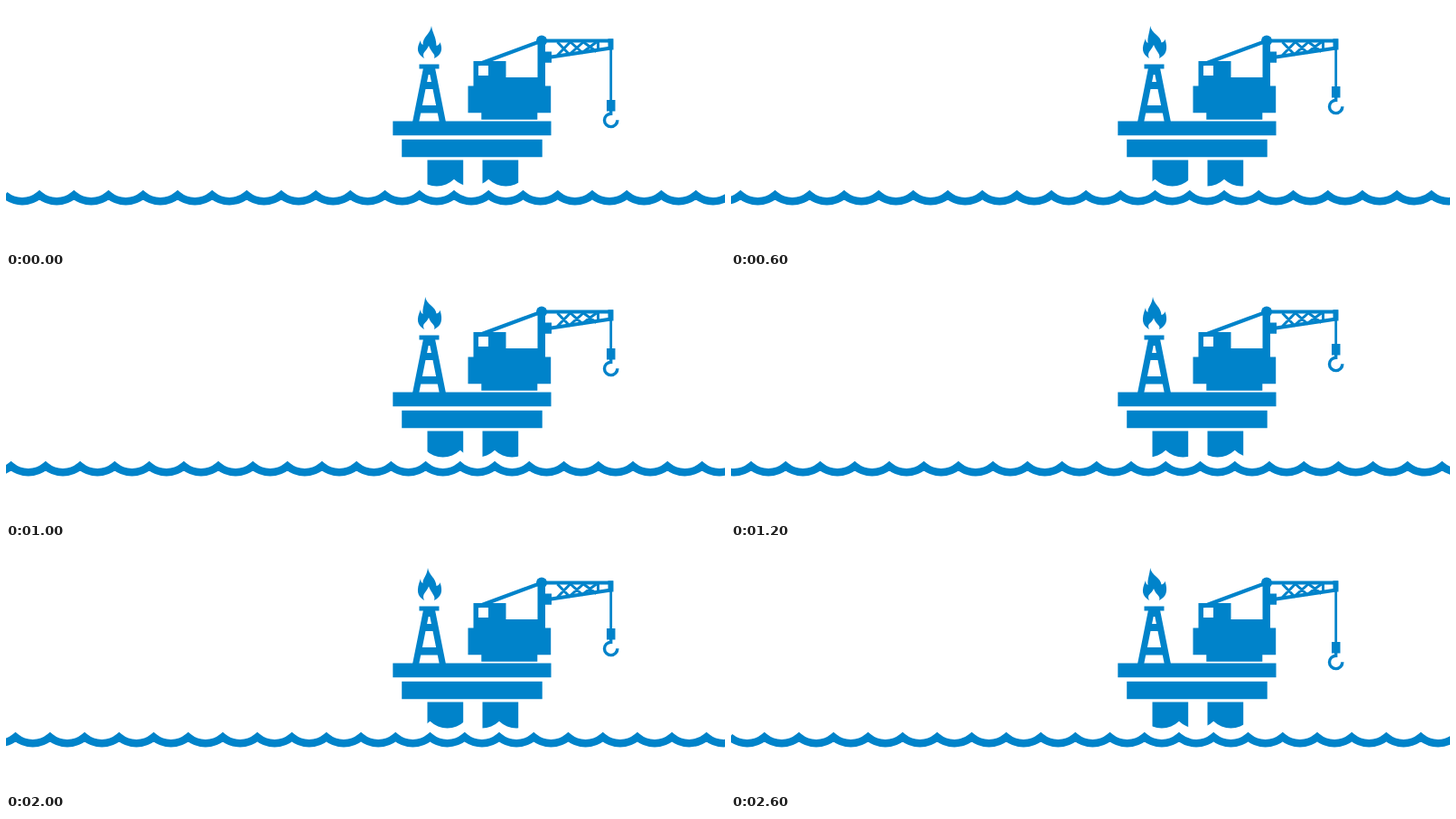
Write an HTML page that moves like this. It is 796 px wide and 269 px high and loops after 2800 ms.

```html
<!DOCTYPE html>
<html lang="en">
<head>
<meta charset="utf-8">
<title>Offshore platform</title>
<style>
  html, body { margin: 0; width: 100%; height: 100%; overflow: hidden; background: #fff; }
  svg { display: block; fill: #0083ca; }
  .line { fill: none; stroke: #0083ca; }
  .white { fill: #fff; }
</style>
</head>
<body>
<svg width="796" height="269" viewBox="0 0 796 269">
  <!-- deck and legs -->
  <path d="M428.300 127.500h175.200v15.700h-175.200zM438.200 147.800h155.500v19.500h-155.500z"/>
  <path d="M466.500 170.600h39.700v30h-39.700zM527.500 170.600h39.700v30h-39.700z"/>

  <!-- flare tower -->
  <path class="line" stroke-width="7" d="M465.900 67L453.500 129M471.100 67L483.500 129"/>
  <path d="M457.500 64.500h22v5h-22zM463 69h11v7h-11zM463 84h11v8h-11zM458 110h21v8.500h-21z"/>
  <path id="flame"/>

  <!-- crane -->
  <path d="M517.500 61h36v18h35v-41h8.500v50.500h6.200v29.800h-14.900v7.500h-62v-7.500h-14.800v-29.800h6z"/>
  <path class="white" d="M523 66h11v11h-11z"/>
  <circle cx="593" cy="38.500" r="6"/>
  <path d="M597 50.500h7v12.300h-7zM666.500 36.200h6v12.300h-6z"/>
  <path class="line" stroke-width="4.200" d="M523 64.500L593 38.500H672M600 57L670 46.500"/>
  <path class="line" stroke-width="3" id="lattice"/>
  <path class="line" stroke-width="2.800" id="cable"/>
  <g id="hook">
    <path d="M665 0h9.500v12.500h-9.500z"/>
    <path class="line" stroke-width="3.400" d="M669.700 12V15.200A7.200 7.200 0 1 0 676.900 22.200"/>
  </g>

  <!-- sea -->
  <g id="sea">
    <path class="white" id="gap"/>
    <path class="line" stroke-width="8.500" id="wave"/>
  </g>
</svg>
<script>
const STEP = 200, STEPS = 14, FLAME_STEPS = 8, WAVE = 38.25;
const el = id => document.getElementById(id);
const setPath = (id, d) => el(id).setAttribute('d', d);

const arcs = r => `a${r} ${r} 0 0 0 ${WAVE} 0`.repeat(24);
setPath('wave', 'M0 209.200' + arcs(29.8));
setPath('gap', `M0 191.800${arcs(27.6)}v14H0z`);

let lattice = 'M655.500 39V49';
for (let i = 0; i < 3; i++) {
  const x = 610.5 + 14.5 * i, h = 14.5 - 2 * i;
  lattice += `M${x} 40l14 ${h}m0 ${-h}l-14 ${h}`;
}
setPath('lattice', lattice);

// the tip sways while the side tongues and the hollow rise and fall
function flamePath(step) {
  const a = step / FLAME_STEPS * 2 * Math.PI;
  const tip = 467 + 4 * Math.cos(a);
  const left = 36 + 2 * Math.cos(2 * a);
  const right = 38 + 2 * Math.cos(a);
  const hollow = 44 - 1.5 * Math.sin(a);
  return `M${tip} 22C${tip + 1} 30 476 33 476.500 ${right + 4}` +
    `Q480 ${right + 3} 480.500 ${right}C484 48 482 54 474 58` +
    `C476 53 471 ${hollow + 8} 468 ${hollow}C465 ${hollow + 7} 460 51 463 58` +
    `C455 53 454 47 459 ${left}Q459 ${left + 4} 461.500 ${left + 5}` +
    `C461 34 ${tip - 1} 31 ${tip} 22z`;
}

function draw() {
  const step = Math.floor(performance.now() / STEP) % STEPS;
  const swing = Math.min(step, STEPS - 1 - step);   // there and back again
  const hookY = 104 - 5 * swing;
  const seaX = (37 + swing * 100 / 6) % WAVE - WAVE;
  el('sea').setAttribute('transform', `translate(${seaX})`);
  el('hook').setAttribute('transform', `translate(0 ${hookY})`);
  setPath('cable', `M669.700 46V${hookY + 1}`);
  setPath('flame', flamePath(step));
  requestAnimationFrame(draw);
}
draw();
</script>
</body>
</html>
```
